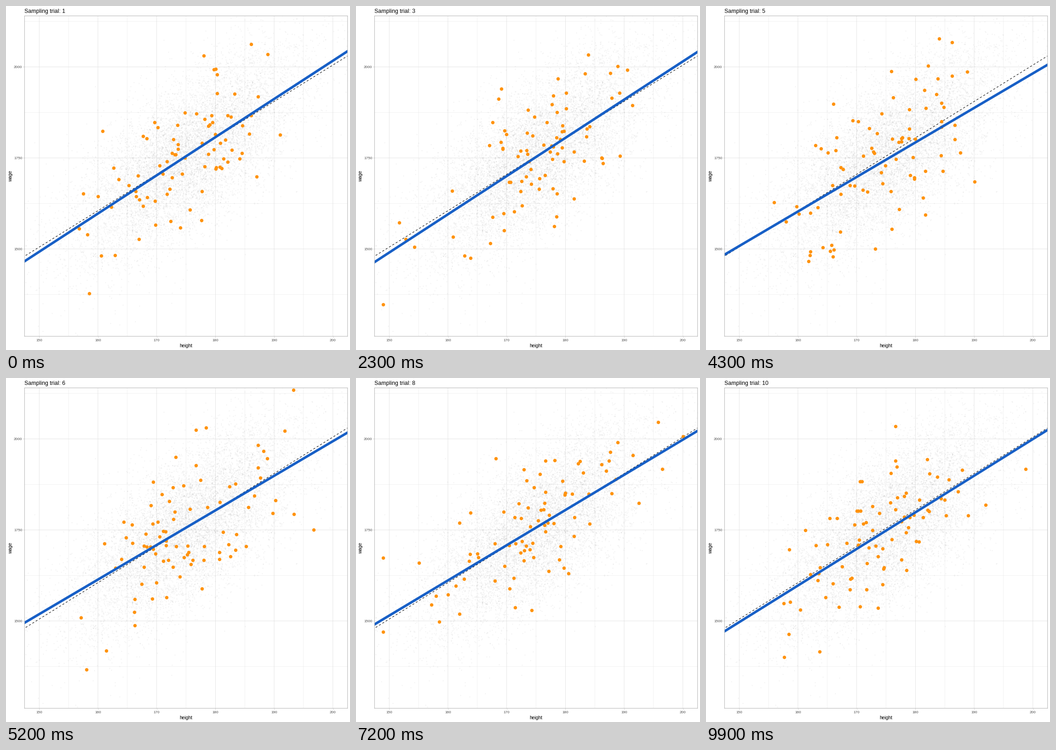
Animation of 748x748 px, one loop 10 s. Source, as a matplotlib script:

```python
import numpy as np
import matplotlib.pyplot as plt
from matplotlib.animation import FuncAnimation

SIZE, DPI = 748, 100
PX = 72 / DPI  # one pixel in points
FRAMES, STEP = 100, 11
XLIM, YLIM = (147.5, 202.5), (1260, 2140)
LEFT, RIGHT, TOP, BOTTOM = 40.3, 742.7, 21.5, 718.2
SAMPLE = 84

plt.rcParams["font.family"] = "Liberation Sans"
rng = np.random.default_rng(11)

# Fitted wage at the left and right panel edge, one key per trial
FIT_LEFT = np.array([1466, 1462, 1464, 1461.5, 1486.5, 1498, 1503, 1480, 1476, 1471.5])
FIT_RIGHT = np.array([2043, 2046, 2041, 2043.5, 2002, 2023, 2028, 2017, 2015, 2024.5])


def draw_sample(left, right):
    """Random people whose least-squares line is the given one."""
    height = np.clip(rng.normal(174.5, 9.2, SAMPLE), 149, 200)
    noise = np.clip(rng.normal(0, 100, SAMPLE), -230, 260)
    noise -= np.polyval(np.polyfit(height, noise, 1), height)
    return height, np.interp(height, XLIM, (left, right)) + noise


samples = [draw_sample(*ends) for ends in zip(FIT_LEFT, FIT_RIGHT)]
pop_height = rng.normal(175, 9.6, 10000)
pop_wage = 5 + 10 * pop_height + rng.normal(0, 102, 10000)

fig = plt.figure(figsize=(SIZE / DPI, SIZE / DPI), dpi=DPI, facecolor="white")
ax = fig.add_axes([LEFT / SIZE, 1 - BOTTOM / SIZE,
                   (RIGHT - LEFT) / SIZE, (BOTTOM - TOP) / SIZE])
ax.set(xlim=XLIM, ylim=YLIM, xticks=range(150, 201, 10), yticks=(1500, 1750, 2000))
ax.set_xticks(range(155, 200, 10), minor=True)
ax.set_yticks(range(1375, 2126, 250), minor=True)
ax.set_axisbelow(True)
ax.grid(which="major", color="#dedede", lw=0.75 * PX, snap=False)
ax.grid(which="minor", color="#dedede", lw=0.4 * PX, snap=False)
ax.tick_params(which="major", length=2.7 * PX, width=0.6 * PX, pad=2.2 * PX,
               color="#b3b3b3", labelcolor="#4d4d4d", labelsize=8.2 * PX)
ax.tick_params(axis="x", which="major", pad=3.4 * PX)
ax.tick_params(which="minor", length=0)
for spine in ax.spines.values():
    spine.set(color="#b3b3b3", linewidth=PX, zorder=8, snap=False)


def label(x, y, text, size, **kw):
    return fig.text(x / SIZE, 1 - y / SIZE, text, fontsize=size * PX, color="black", **kw)


title = label(40, 14.6, "", 12.3, va="baseline")
label(391.5, 741.6, "height", 10.25, ha="center", va="baseline")
label(10, 370, "wage", 10.25, ha="center", va="center", rotation=90)

ax.plot(pop_height, pop_wage, "o", ms=2.5 * PX, mew=0, color="black", alpha=0.042, zorder=2)
ax.plot((147.7, XLIM[1]), (1482, 2030), color="black", lw=1.07 * PX, dashes=(4, 4),
        dash_capstyle="butt", zorder=3)
dots, = ax.plot([], [], "o", ms=7.5 * PX, mew=0, color="#ff930f", zorder=4)
fit, = ax.plot(XLIM, YLIM, color="#175fc6", lw=5.4 * PX,
               solid_capstyle="projecting", zorder=5)


def update(n):
    # The sample holds for a whole step while the line glides to the next fit
    time = n / STEP
    trials = np.arange(len(samples))
    dots.set_data(*samples[n // STEP])
    fit.set_ydata([np.interp(time, trials, ends) for ends in (FIT_LEFT, FIT_RIGHT)])
    title.set_text(f"Sampling trial: {round(time) + 1}")
    return dots, fit, title


anim = FuncAnimation(fig, update, frames=FRAMES, interval=100, repeat=True, repeat_delay=0)
plt.show()
```
